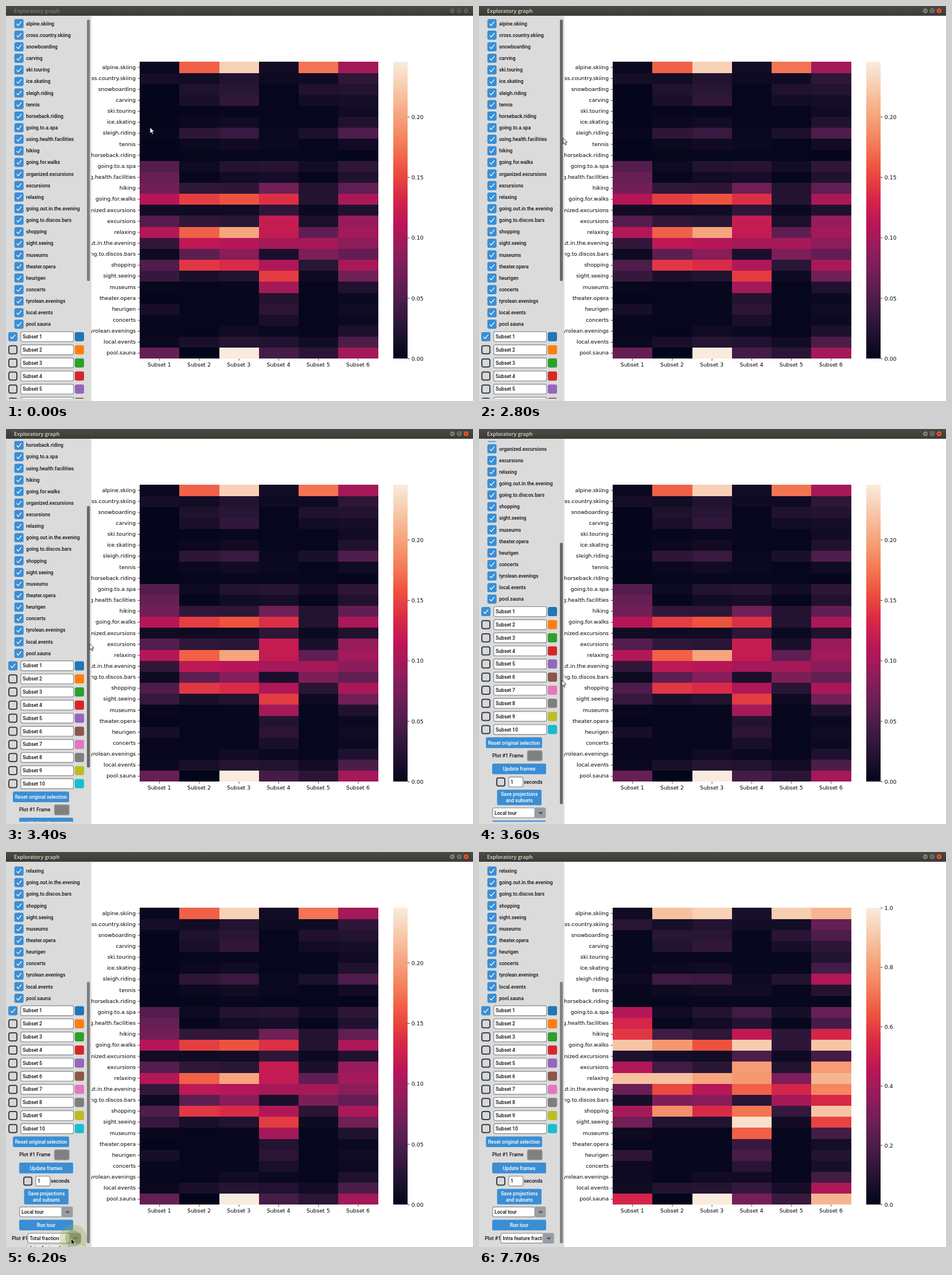
Recreate the animation shown at these times as an HTML page with a canvas. Size 814 px wide and 688 px high, loop 8 s.

```html
<!DOCTYPE html>
<html lang="en">
<head>
<meta charset="utf-8">
<title>Exploratory graph</title>
<style>
html, body { margin: 0; width: 100%; height: 100%; overflow: hidden; background: #fff; }
canvas { display: block; width: 814px; height: 688px; }
</style>
</head>
<body>
<canvas id="stage" width="814" height="688"></canvas>
<script>
const ctx = document.getElementById('stage').getContext('2d');
const LOOP = 8000, STEP = 100;
const UI = '500 8.67px Roboto, sans-serif';
const PLOT = '9.33px "DejaVu Sans", sans-serif';
const BLUE = '#3b8ed3';

// Share of each feature per subset in percent; gaps are close to zero.
const FEATURES = [
  ['alpine.skiing', [4, 89, 93, 7, 92, 86]],
  ['cross.country.skiing', [11, 6, 9, 5, 5, 26]],
  ['snowboarding', [, 11, 11, , 11, 20]],
  ['carving', [, 9, 13, , 6, 12]],
  ['ski.touring', [, , , , , 9]],
  ['ice.skating', [, 3, 4, , , 18]],
  ['sleigh.riding', [3, 16, 15, 3, 9, 44]],
  ['tennis', [, 3, 4, 4, , 9]],
  ['horseback.riding', []],
  ['going.to.a.spa', [44, 4, 9, 17, 6, 26]],
  ['using.health.facilities', [53, , 4, 9, , 18]],
  ['hiking', [58, 17, 12, 47, 12, 53]],
  ['going.for.walks', [90, 79, 64, 92, 12, 90]],
  ['organized.excursions', [8, 5, 4, 20, 3, 18]],
  ['excursions', [44, 17, 11, 80, 9, 80]],
  ['relaxing', [89, 89, 82, 79, 32, 86]],
  ['going.out.in.the.evening', [27, 62, 45, 67, 53, 75]],
  ['going.to.discos.bars', [6, 32, 34, 11, 41, 54]],
  ['shopping', [41, 77, 55, 71, 14, 90]],
  ['sight.seeing', [29, 9, 9, 97, 4, 61]],
  ['museums', [3, , , 67, , 18]],
  ['theater.opera', [, , , 15, , 5]],
  ['heurigen', [12, , , 19, , 9]],
  ['concerts', [3, , , 11, , 6]],
  ['tyrolean.evenings', [3, , 4, 4, , 17]],
  ['local.events', [4, 9, 10, 14, 6, 43]],
  ['pool.sauna', [53, 0, 100, 30, 15, 86]]
];
const SUBSET_WEIGHT = [.497, .754, 1, .61, .77, .468];
const SUBSET_COLORS = ['#1f77b4', '#ff7f0e', '#2ca02c', '#d62728', '#9467bd',
  '#8c564b', '#e377c2', '#7f7f7f', '#bcbd22', '#17becf'];
const RAMP = ['#03051a', '#221331', '#451c47', '#6a1f56', '#921c5b', '#b91657',
  '#d92847', '#ed503e', '#f47d57', '#f6a47c', '#f7c9aa', '#faebdd'];

// Keyframes: time, then values.
const CURSOR = [[0, 250.5, 211], [700, 143, 179], [800, 143, 179], [1000, 140, 179],
  [1200, 140, 179], [1600, 151, 213], [1700, 151, 213], [1800, 149.5, 213],
  [2000, 145.5, 213], [2700, 145.5, 213], [3100, 147.5, 279], [3600, 144, 437],
  [4100, 144.5, 490], [4200, 144.5, 490], [4500, 125, 690], [4900, 120, 690],
  [5000, 119, 686], [5200, 122.5, 664], [5700, 122.5, 664], [5900, 113, 673],
  [6400, 113, 673], [6600, 112, 690]];
const SCROLL = [[2800, 0], [2900, 3], [3100, 22], [3600, 258], [3900, 290], [4100, 299.6]];

function at(keys, t) {
  let i = 0;
  while (i < keys.length - 1 && keys[i + 1][0] <= t) i++;
  const a = keys[i], b = keys[i + 1];
  if (!b || t <= a[0]) return a.slice(1);
  const k = (t - a[0]) / (b[0] - a[0]);
  return a.slice(1).map((v, j) => v + (b[j + 1] - v) * k);
}

function ramp(v) {
  const p = Math.min(v, 1) * (RAMP.length - 1);
  const i = Math.min(Math.floor(p), RAMP.length - 2);
  const channel = (hex, n) => parseInt(hex.slice(1 + n * 2, 3 + n * 2), 16);
  const mix = n => Math.round(channel(RAMP[i], n) + (channel(RAMP[i + 1], n) - channel(RAMP[i], n)) * (p - i));
  return `rgb(${mix(0)},${mix(1)},${mix(2)})`;
}

function text(str, x, y, color = '#111', font = UI, align = 'left') {
  ctx.font = font;
  ctx.textAlign = align;
  ctx.fillStyle = color;
  ctx.fillText(str, x, y);
}

function rect(x, y, w, h, fill) {
  ctx.fillStyle = fill;
  ctx.fillRect(x, y, w, h);
}

function box(x, y, w, h, r, fill, stroke, line = 1.4) {
  ctx.beginPath();
  ctx.roundRect(x, y, w, h, r);
  ctx.fillStyle = fill;
  ctx.fill();
  if (!stroke) return;
  ctx.strokeStyle = stroke;
  ctx.lineWidth = line;
  ctx.stroke();
}

function polyline(points, color, width) {
  ctx.beginPath();
  points.forEach(p => ctx.lineTo(...p));
  ctx.strokeStyle = color;
  ctx.lineWidth = width;
  ctx.stroke();
}

function disc(x, y, r, fill) {
  ctx.beginPath();
  ctx.arc(x, y, r, 0, Math.PI * 2);
  ctx.fillStyle = fill;
  ctx.fill();
}

function checkbox(x, y, on) {
  if (!on) return box(x - 7, y - 7, 14, 14, 3, '#d8d8d8', '#394149', 2);
  box(x - 8, y - 8, 16, 16, 3, BLUE);
  polyline([[x - 4, y + .3], [x - 1.3, y + 3.2], [x + 4.2, y - 3.6]], '#fff', 1.3);
}

function button(x, y, w, h, ...lines) {
  box(x, y - h / 2, w, h, 2.5, BLUE);
  lines.forEach((s, i) =>
    text(s, x + w / 2, y + 3.1 + (i - (lines.length - 1) / 2) * 11, '#fff', UI, 'center'));
}

function input(x, y, w, value) {
  box(x + .7, y - 8.6, w - 1.4, 17.2, 3, '#fff', '#92979c');
  ctx.save();
  ctx.beginPath();
  ctx.rect(x, y - 9, w - 2, 18);
  ctx.clip();
  text(value, x + 4, y + 3.1);
  ctx.restore();
}

function combo(x, y, value) {
  input(x, y, 75, value);
  box(x + 75, y - 9.3, 18.5, 18.6, [0, 3, 3, 0], '#989da3');
  polyline([[x + 81.5, y - 1.5], [x + 84.3, y + 1.5], [x + 87.1, y - 1.5]], '#222', 1.2);
}

function titleBar(active) {
  const g = ctx.createLinearGradient(0, 0, 0, 17);
  g.addColorStop(0, '#4b4a45');
  g.addColorStop(1, '#3b3a36');
  rect(0, 0, 814, 17, g);
  text('Exploratory graph', 14, 11.5, active ? '#dfdbd2' : '#817e78',
    '600 9.2px "Open Sans", sans-serif');
  [778, 790, 802].forEach((x, i) => {
    const close = active && i === 2;
    disc(x, 8.3, 4.9, '#33322e');
    disc(x, 8.3, 4.3, close ? '#ee5b30' : active ? '#83807a' : '#65635e');
    const ink = close ? '#5a2413' : '#3b3a36';
    if (i === 0) polyline([[x - 2, 8.3], [x + 2, 8.3]], ink, 1);
    if (i === 1) {
      ctx.strokeStyle = ink;
      ctx.lineWidth = 1;
      ctx.strokeRect(x - 1.7, 6.6, 3.4, 3.4);
    }
    if (i === 2) {
      polyline([[x - 1.8, 6.5], [x + 1.8, 10.1]], ink, 1);
      polyline([[x + 1.8, 6.5], [x - 1.8, 10.1]], ink, 1);
    }
  });
}

function chart(intra) {
  const left = 233, top = 97.4, w = 415.5, h = 517, bottom = top + h;
  const cw = w / 6, ch = h / FEATURES.length;
  FEATURES.forEach(([name, values], row) => {
    const y0 = Math.round(top + row * ch), y1 = Math.round(top + (row + 1) * ch);
    for (let col = 0; col < 6; col++) {
      const share = (values[col] ?? 1.3) / 100;
      const x0 = Math.round(left + col * cw), x1 = Math.round(left + (col + 1) * cw);
      rect(x0, y0, x1 - x0, y1 - y0, ramp(intra ? share : share * SUBSET_WEIGHT[col]));
    }
    const mid = top + (row + .5) * ch;
    polyline([[229.7, mid], [233, mid]], '#000', .8);
    text(name, 226.2, mid + 2.6, '#000', PLOT, 'right');
  });
  for (let col = 0; col < 6; col++) {
    const x = left + (col + .5) * cw;
    polyline([[x, bottom], [x, bottom + 3.3]], '#000', .8);
    text('Subset ' + (col + 1), x - .4, 628.4, '#000', PLOT, 'center');
  }
  const g = ctx.createLinearGradient(0, bottom, 0, top);
  RAMP.forEach((c, i) => g.addColorStop(i / (RAMP.length - 1), c));
  rect(675, 97, 25, 517, g);
  const [max, gap, digits] = intra ? [1, .2, 1] : [.2455, .05, 2];
  for (let v = 0; v <= max + .001; v += gap) {
    const y = bottom - v / max * h;
    polyline([[700, y], [703.3, y]], '#000', .8);
    text(v.toFixed(digits), 706.8, y + 3.5, '#000', PLOT);
  }
}

function panel(t, intra) {
  const [scroll] = at(SCROLL, t);
  rect(0, 17, 148.7, 671, '#dbdbdb');
  ctx.save();
  ctx.beginPath();
  ctx.rect(0, 21, 148.7, 663);
  ctx.clip();
  ctx.translate(0, -scroll);
  FEATURES.forEach(([name], i) => {
    const y = 30.7 + i * 20.14;
    checkbox(22.6, y, true);
    text(name, 35, y + 3);
  });
  SUBSET_COLORS.forEach((color, i) => {
    const y = 576 + i * 22.83;
    checkbox(12, y, i === 0);
    input(25, y, 93.5, 'Subset ' + (i + 1));
    box(120, y - 8, 16, 16, 3, color);
  });
  button(12, 804.4, 98, 18.6, 'Reset original selection');
  text('Plot #1 Frame', 23, 830);
  box(84.5, 818.3, 25.5, 17.4, 2.5, '#808080', '#93979b');
  button(23, 850, 94, 18.6, 'Update frames');
  checkbox(38, 872.8, false);
  input(51, 872.8, 26.5, '1');
  text('seconds', 78, 875.8);
  button(31.5, 899.8, 77.5, 27, 'Save projections', 'and subsets');
  combo(23, 926.5, 'Local tour');
  button(23, 949.4, 94, 18.6, 'Run tour');
  text('Plot #1', 10, 975.4);
  combo(37.3, 972.3, intra ? 'Intra feature fraction' : 'Total fraction');
  ctx.restore();

  const hover = (t >= 700 && t < 1600) || (t >= 2000 && t < 4400);
  box(141, 23.5 + scroll * .676, 5.2, 455.5, 2.6, hover ? '#696969' : '#808080');
}

function popup(t) {
  if (t < 5900 || t >= 7400) return;
  rect(35, 684, 104, 4, 'rgba(0,0,0,.12)');
  rect(37.5, 684.5, 99.5, 4, t >= 6900 ? '#d5d8db' : '#eeeeee');
  text('Intra feature fraction', 42, 692.5);
}

function ripple(t) {
  if (t < 5800 || t >= 6600) return;
  const k = (t - 5800) / 800;
  const fade = Math.min(1, (1 - k) * 2);
  disc(117, 673, 14 + 20 * k, `rgba(150,165,70,${.32 * fade})`);
  disc(117, 673, 6 + 16 * k, `rgba(110,125,50,${.35 * fade})`);
}

function cursor(t) {
  if ((t >= 4500 && t < 5000) || t >= 6600) return;
  const [x, y] = at(CURSOR, t);
  const dark = t >= 5400;
  ctx.beginPath();
  [[.5, .5], [.5, 10.8], [2.9, 8.6], [4.6, 12.6], [6.3, 11.9], [4.6, 8], [7.9, 7.8]]
    .forEach(([dx, dy]) => ctx.lineTo(x + dx, y + dy));
  ctx.closePath();
  ctx.fillStyle = dark ? '#111' : '#fff';
  ctx.strokeStyle = dark ? '#eee' : '#222';
  ctx.lineWidth = .9;
  ctx.fill();
  ctx.stroke();
}

function draw(now) {
  const t = Math.floor((now % LOOP) / STEP) * STEP;
  const intra = t >= 7700;
  rect(0, 0, 814, 688, '#fff');
  chart(intra);
  panel(t, intra);
  titleBar(t >= 1300);
  popup(t);
  ripple(t);
  cursor(t);
}

const start = performance.now();
function tick() {
  draw(performance.now() - start);
  requestAnimationFrame(tick);
}
tick();
</script>
</body>
</html>
```
